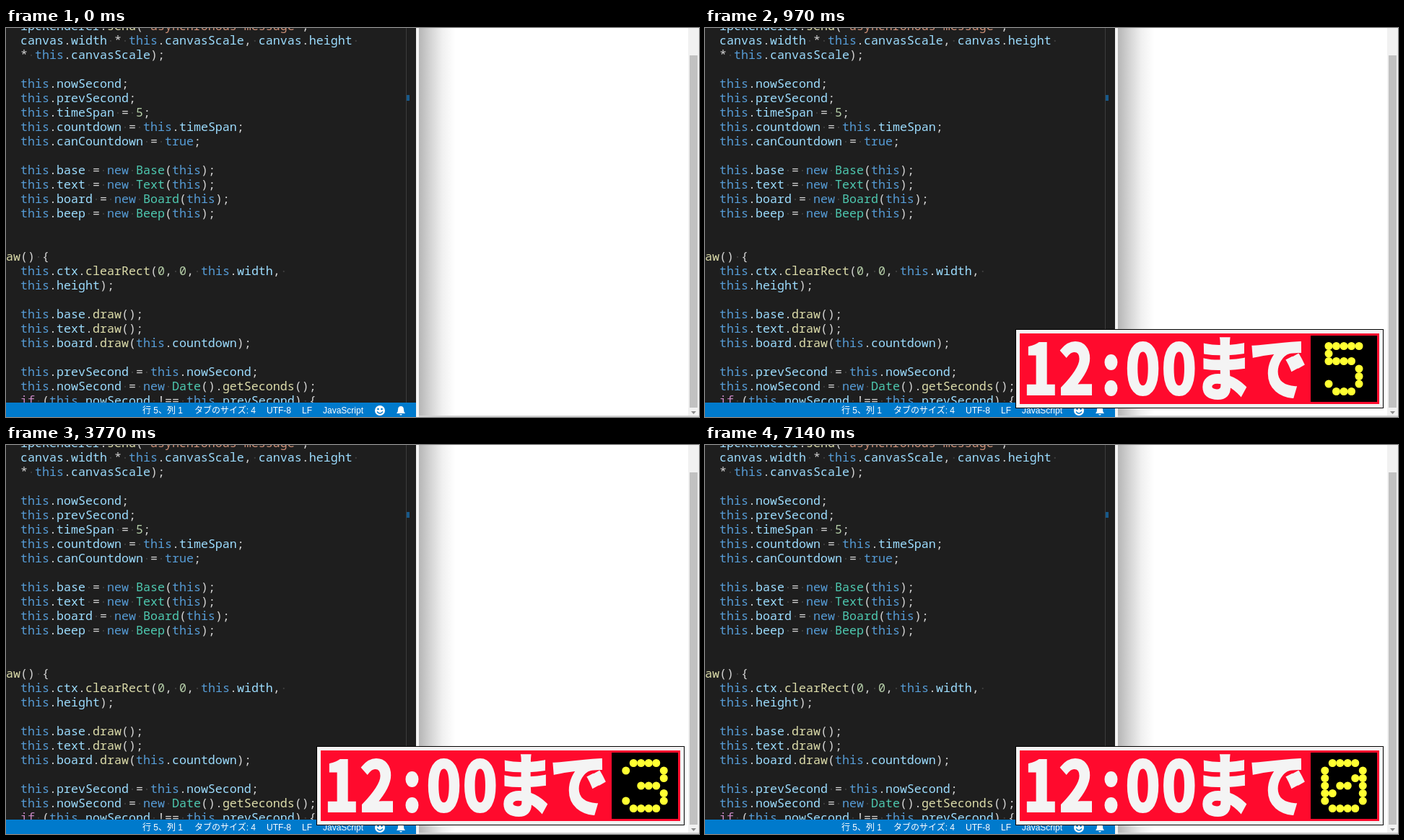
An HTML page that plays this animation: 960x540 px, repeating every 8 s.

```html
<!DOCTYPE html>
<html lang="ja">
<head>
<meta charset="utf-8">
<style>
html, body { margin: 0; width: 100%; height: 100%; overflow: hidden; background: #fff; }
div, pre, span.at, svg { position: absolute; margin: 0; }
#editor { left: 0; top: 0; width: 568px; height: 540px; background: #1e1e1e; overflow: hidden; }
#code { left: -20px; top: -13px; color: #d4d4d4; font: 16.667px/20px "Noto Sans Mono", monospace; }
#ruler { left: 554px; top: 0; width: 1px; height: 520px; background: #3c3c3c; }
#mark { left: 555px; top: 93px; width: 4px; height: 8px; background: #17598a; }
#status { left: 0; top: 520px; width: 568px; height: 20px; background: #007acc; color: #fff; font: 12px/22px "Liberation Sans", "Noto Sans CJK JP", sans-serif; white-space: nowrap; }
.at { top: 0; }
#edge { left: 568px; top: 0; width: 4px; height: 540px; background: #f4f4f4; }
#shade { left: 572px; top: 0; width: 50px; height: 540px; background: linear-gradient(90deg, #b6b6b6, #d2d2d2 30%, #f0f0f0 65%, #fff); }
#scroll { left: 945px; top: 0; width: 15px; height: 540px; background: #f1f1f1; }
#thumb { left: 2px; top: 38px; width: 11px; height: 489px; background: #c1c1c1; }
#floor { left: 572px; top: 538px; width: 388px; height: 2px; background: #d2d2d2; }
svg { left: 0; top: 0; }
#title { font: 900 94px "Noto Sans CJK JP", sans-serif; text-anchor: middle; fill: #f4f4f4; stroke: #f4f4f4; stroke-width: 4; }
</style>
</head>
<body>
<div id="editor">
  <pre id="code"></pre>
  <div id="ruler"></div><div id="mark"></div>
  <div id="status">
    <span class="at" style="left:189px">行 5、列 1</span>
    <span class="at" style="left:261px">タブのサイズ: 4</span>
    <span class="at" style="left:361px">UTF-8</span>
    <span class="at" style="left:410px">LF</span>
    <span class="at" style="left:439px">JavaScript</span>
  </div>
</div>
<div id="edge"></div><div id="shade"></div>
<div id="scroll"><div id="thumb"></div></div>
<div id="floor"></div>
<svg width="960" height="540">
  <circle cx="518" cy="531" r="7" fill="#fff"/>
  <g fill="#007acc"><circle cx="515.5" cy="529" r="1.3"/><circle cx="520.5" cy="529" r="1.3"/></g>
  <path d="M514 532.5q4 5 8 0" fill="none" stroke="#007acc" stroke-width="1.4"/>
  <path d="M541 535q2-2 2-5q0-5 4-5t4 5q0 3 2 5zM545 536h4q-2 3-4 0" fill="#fff"/>
  <path d="M949 532h7l-3.5 4z" fill="#8a8a8a"/>
  <g id="banner">
    <rect x="430.5" y="418.5" width="509" height="109" fill="#f4f4f4" stroke="#000"/>
    <rect x="436" y="424" width="498" height="98" fill="#ff0a2d"/>
    <text id="title" transform="translate(440 508) scale(.85 1)" x="29 88 144 196 255 327 416">12:00まで</text>
    <rect x="839" y="427" width="92" height="92" fill="#000"/>
    <g id="dots" fill="#ffff32"></g>
  </g>
</svg>
<script>
const $ = id => document.getElementById(id);

const lines = `  ipcRenderer.send('asynchronous-message',
  canvas.width * this.canvasScale, canvas.height~
  * this.canvasScale);

  this.nowSecond;
  this.prevSecond;
  this.timeSpan = 5;
  this.countdown = this.timeSpan;
  this.canCountdown = true;

  this.base = new Base(this);
  this.text = new Text(this);
  this.board = new Board(this);
  this.beep = new Beep(this);


draw() {
  this.ctx.clearRect(0, 0, this.width,~
  this.height);

  this.base.draw();
  this.text.draw();
  this.board.draw(this.countdown);

  this.prevSecond = this.nowSecond;
  this.nowSecond = new Date().getSeconds();
  if (this.nowSecond !== this.prevSecond) {`;

const colours = ['#ce9178', '#569cd6', '#c586c0', '#4ec9b0', '#b5cea8', '#dcdcaa', '#9cdcfe', '#404040'];
const token = /('.*?')|\b(this|new|true)\b|\b(if)\b|\b([A-Z]\w*)|(\d+)|(\w+(?=\())|(\w+)|([ ~])/g;
const paint = line => line.replace(token, (s, ...groups) => {
  const kind = groups.findIndex(g => g);
  return `<span style="color:${colours[kind]}">${kind === 7 ? '·' : s}</span>`;
});
$('code').innerHTML = lines.split('\n').map(line => {
  const body = line.trimStart();
  return ' '.repeat(2 * (line.length - body.length)) + paint(body);
}).join('\n');

const digits = [
  '.####. #....# #...## #.##.# ##...# #....# .####.',
  '..#.. .##.. #.#.. ..#.. ..#.. ..#.. #####',
  '.####. #....# .....# ...##. .##... #..... ######',
  '.####. #....# .....# ..###. .....# #....# .####.',
  '....#. ...##. ..#.#. .#..#. ###### ....#. ....#.',
  '##### #.... ####. ....# ....# #...# .###.'
];
const pitch = 10.5;
function showDigit(n) {
  $('dots').innerHTML = digits[n].split(' ').map((row, y) => [...row].map((c, x) =>
    c === '#' ? `<circle cx="${885 + (x - (row.length - 1) / 2) * pitch}" cy="${441.5 + y * pitch}" r="5.5"/>` : ''
  ).join('')).join('');
}

const clamp = (v, lo, hi) => Math.min(hi, Math.max(lo, v));
let shown, start;
function frame(now) {
  start ??= now;
  const t = (now - start) % 8000;
  $('banner').setAttribute('opacity', clamp((t - 725) / 150, 0, 1));
  const n = 5 - clamp(Math.floor((t - 1770) / 1000), 0, 5);
  if (n !== shown) showDigit(shown = n);
  requestAnimationFrame(frame);
}
requestAnimationFrame(frame);
</script>
</body>
</html>
```
